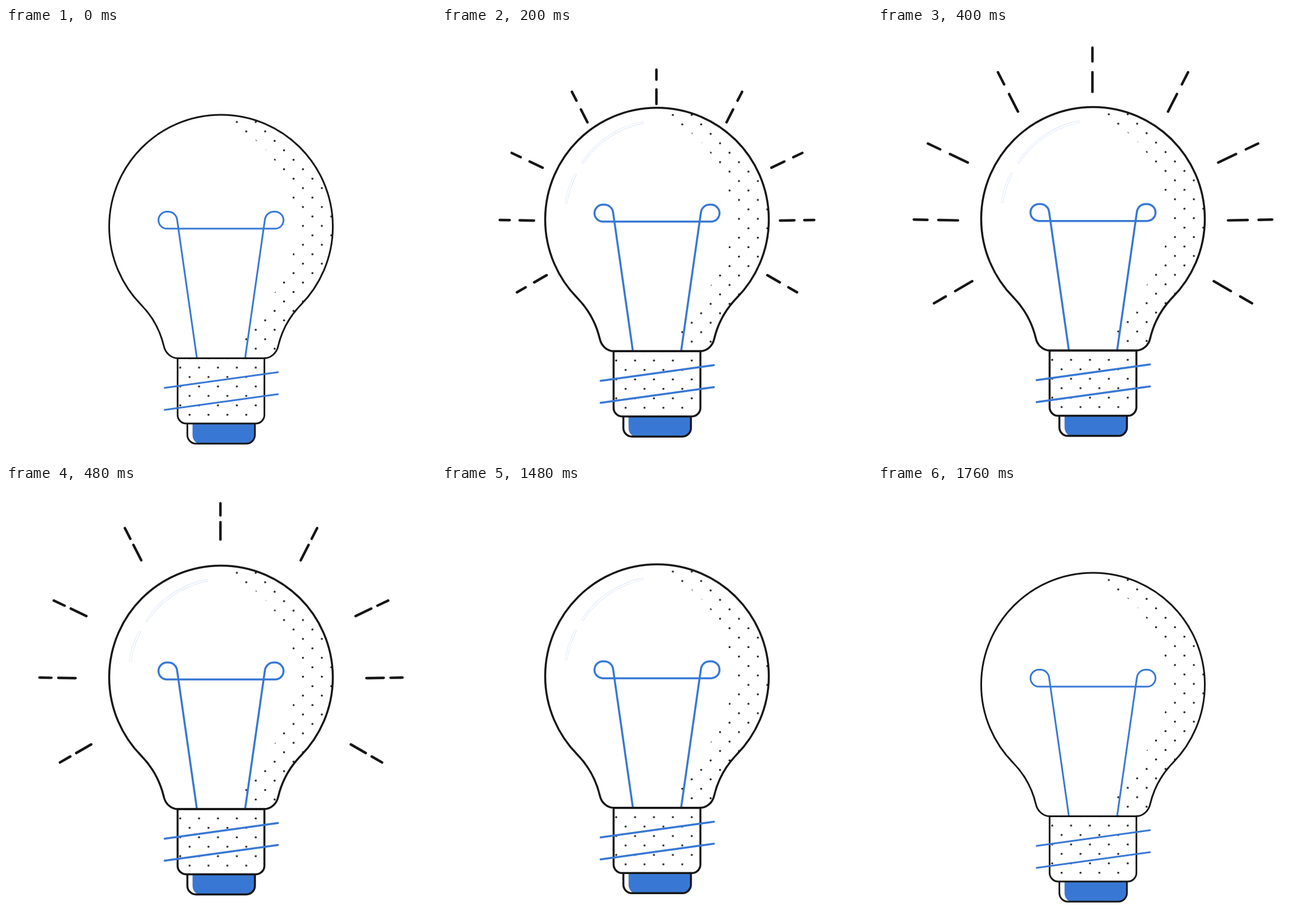
An HTML page that plays this animation: 748 px wide and 748 px high, repeating every 2.88 s.

```html
<!DOCTYPE html>
<html lang="en">
<head>
<meta charset="utf-8">
<title>Light bulb</title>
<style>
  html, body { margin: 0; width: 100%; height: 100%; overflow: hidden; background: #fff; }
  svg { display: block; width: 100vw; height: 100vh; }
  .ink, .wire { fill: none; stroke: #161616; stroke-linecap: round; stroke-linejoin: round; }
  .wire { stroke: #3878d4; }
  .flat { stroke-linecap: butt; }
  #shine { fill: none; stroke: #fff; stroke-linecap: round; }
  #rim { stroke: #cbdaf4; stroke-width: 4; }
  #rays { fill: none; stroke: #161616; stroke-width: 4.4; stroke-linecap: round; }
</style>
</head>
<body>
<svg viewBox="0 0 748 748">
  <defs>
    <path id="glass" d="M299 574.5C287 574.5 277 565 274.5 553C268 526 254 501 235.5 482A194.5 194.5 0 1 1 512.5 482C494 501 480 526 473.5 553C471 565 461 574.5 449 574.5Z"/>
    <path id="neck" d="M298.5 574.5V673A15 15 0 0 0 313.5 688H434.5A15 15 0 0 0 449.5 673V574.5Z"/>
    <path id="arcs" d="M349 176.5A165 165 0 0 0 245 246.5M232 267A165 165 0 0 0 216 316"/>
    <pattern id="dots" patternUnits="userSpaceOnUse" x="393.4" y="155.3" width="32.86" height="32.86">
      <g fill="#161616"><circle cx="8.2" cy="8.2" r="1.75"/><circle cx="24.6" cy="24.6" r="1.75"/></g>
    </pattern>
    <!-- crescent: the glass without a copy of itself moved left -->
    <mask id="crescent" maskUnits="userSpaceOnUse" x="0" y="0" width="748" height="748">
      <rect width="748" height="748" fill="#fff"/>
      <use href="#glass" x="-63.5"/>
    </mask>
  </defs>
  <use id="glow" href="#glass" x="20" y="-4" fill="#adc8f5"/>
  <path id="rays"/>
  <g id="bulb">
    <g id="shine">
      <use id="rim" href="#arcs"/>
      <use id="gloss" href="#arcs"/>
    </g>
    <g mask="url(#crescent)"><use href="#glass" fill="url(#dots)"/></g>
    <path class="wire flat" d="M332 574L297.6 333C296.4 325 290 319.6 282 319.6H280A14.75 14.75 0 0 0 280 349.1H468A14.75 14.75 0 0 0 468 319.6H466C458 319.6 451.6 325 450.4 333L416 574"/>
    <path fill="#3878d4" d="M324.5 688H433V708A15 15 0 0 1 418 723H337A12.5 15 0 0 1 324.5 708Z"/>
    <path class="ink" d="M315.5 688V708A15 15 0 0 0 330.5 723H418A15 15 0 0 0 433 708V688"/>
    <use href="#neck" fill="#fff"/>
    <use href="#neck" fill="url(#dots)"/>
    <use class="ink" href="#neck"/>
    <path class="wire" d="M276 626L473 598.7M276 664.3L473 637"/>
    <use class="ink" href="#glass"/>
  </g>
</svg>
<script>
const $ = id => document.getElementById(id);
const LOOP = 2880, STEP = 40;
const RISE = 300, SETTLE = 480, PEAK = 14.8, REST = 12.5;
const LIT = 640, EXIT = 1480, END = 1760;

// Base point of each ray and its angle from straight up; the left side is mirrored.
const left = [[253, 164, -27], [175, 243, -64.5], [160, 335, -89], [182, 430, -120]];
const rays = [[373, 132, 0], ...left, ...left.map(([x, y, a]) => [748 - x, y, -a])];

// Rays shoot out, then both dashes drift outwards and shrink.
function rayPath(t) {
  if (t <= 120 || t >= LIT) return '';
  const grow = 1 - Math.max(0, (320 - t) / 200) ** 2;
  const drift = Math.max(0, (t - 320) / 160) ** 0.9;
  const shrink = 1 - 0.23 * drift;
  const dash = ([x, y, angle], from, len) => {
    const a = angle * Math.PI / 180;
    const at = d => `${x + Math.sin(a) * d} ${y - Math.cos(a) * d}`;
    return `M${at(from)}L${at(from + len)}`;
  };
  return rays.map(ray =>
    dash(ray, 39 * drift, 39 * grow * shrink) +
    dash(ray, 66 * grow + 15 * drift, 27 * grow * shrink)).join('');
}

// The bulb rises past its resting height, then settles.
function lift(t) {
  if (t < RISE) return PEAK * Math.sin(t / RISE * Math.PI / 2) ** 1.3;
  const p = (t - RISE) / (SETTLE - RISE);
  return REST + (PEAK - REST) * (1 + Math.cos(p * Math.PI)) / 2;
}

function draw(time) {
  const t = Math.floor(time % LOOP / STEP) * STEP;
  // The way down replays the rise backwards.
  const pose = t < EXIT ? Math.min(t, SETTLE) : Math.max(0, END - t);
  const lit = pose <= 120 || (t >= LIT && t < EXIT);
  const fade = Math.min(1, pose / 120);
  $('bulb').setAttribute('transform', `translate(0 ${-lift(pose)})`);
  $('bulb').setAttribute('stroke-width', 3 + 0.5 * fade);
  $('glow').setAttribute('opacity', lit ? fade : 0);
  $('shine').setAttribute('opacity', fade);
  $('rim').setAttribute('opacity', lit ? 0 : 1);
  $('gloss').setAttribute('stroke-width', lit ? 3.6 : 2.8);
  $('rays').setAttribute('d', rayPath(t));
}

const begin = performance.now();
function tick() {
  draw(performance.now() - begin);
  requestAnimationFrame(tick);
}
tick();
</script>
</body>
</html>
```
